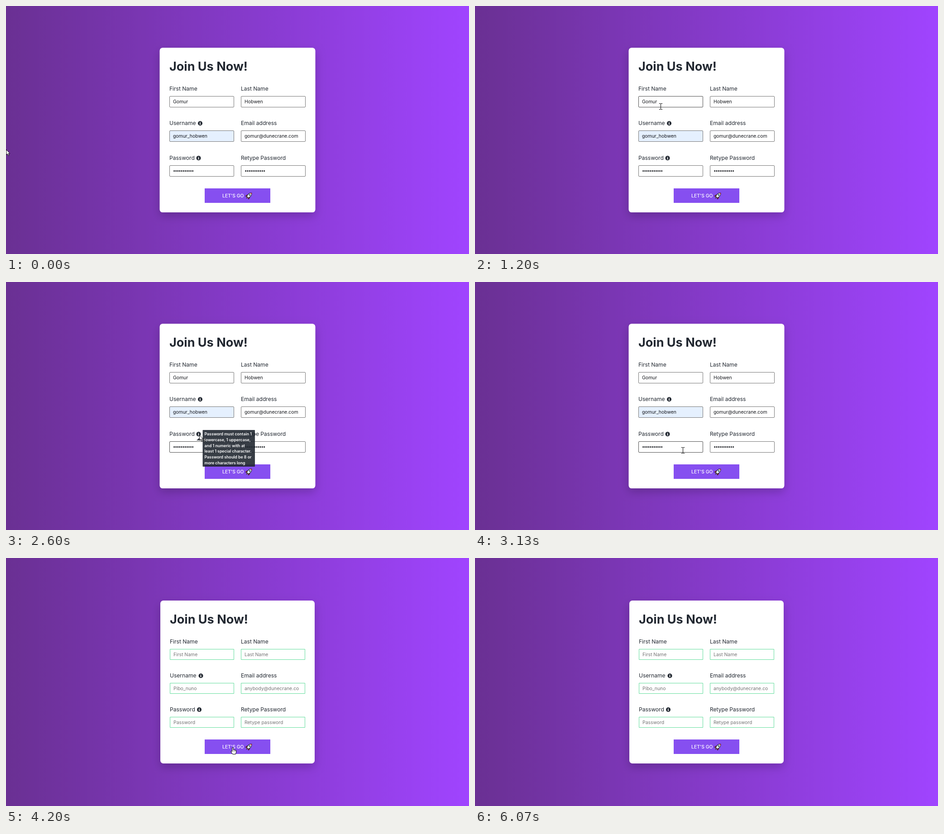
Recreate the animation shown at these times as an HTML page with a canvas. Size 1023 by 548 pixels, loop 6870 ms.

```html
<!DOCTYPE html>
<html lang="en">
<head>
<meta charset="utf-8">
<title>Sign-up form</title>
<style>
  html, body { margin: 0; width: 100%; height: 100%; overflow: hidden; }
  canvas { display: block; width: 100%; height: 100%; }
</style>
</head>
<body>
<canvas id="stage" width="1023" height="548"></canvas>
<script>
const ctx = document.getElementById('stage').getContext('2d');
const W = 1023, H = 548, LOOP = 6870;
const INK = '#222831';
const FONT = 'Inter, "Open Sans", sans-serif';

const filled = {
  card: [339.5, 92.3, 344, 363.8], title: 142.8, x: [361, 519], w: 143,
  rows: [[187, 199, 25], [263, 275, 25], [340, 352, 25]],
  pad: 8, button: 403, border: '#767676', text: '#16181d',
  values: [['Gomur', 'Hobwen'], ['gomur_hobwen', 'gomur@dunecrane.com'], [null, null]]
};
const empty = {
  card: [341, 94, 341, 360], title: 144.8, x: [362, 519], w: 142,
  rows: [[189, 201, 24], [264, 276, 24], [339, 351, 24]],
  pad: 8, button: 401, border: '#62dd9c', text: '#757575',
  values: [['First Name', 'Last Name'], ['Pibo_nuno', 'anybody@dunecrane.co'], ['Password', 'Retype password']]
};
const labels = [['First Name', 'Last Name'], ['Username', 'Email address'], ['Password', 'Retype Password']];

const tips = [
  { box: [438, 250, 115.5, 120], x: 442.5, arrow: [429.5, 268], lines: [
    'Username should be', 'between 4 to 25', 'characters long. Must', 'start with a letter. It only',
    'accepts letters, numbers', 'and undrescore', 'character but cannot', 'end with an underscore', 'character'] },
  { box: [434.5, 327, 115.5, 81], x: 438.5, arrow: [426.5, 345], lines: [
    'Password must contain 1', 'lowercase, 1 uppercase,', 'and 1 numeric with at', 'least 1 special character.',
    'Password should be 8 or', 'more characters long'] }
];

// pointer stops: tick (1/15 s), x, y
const path = [
  [0, 0, 317], [4, 190, 292], [8, 425, 244], [9, 425, 244], [10, 424, 244], [12, 424, 244],
  [18, 410, 222], [20, 411, 223], [23, 429, 249], [24, 429, 249], [25, 431, 260], [26, 431, 268.5],
  [33, 431, 268.5], [36, 428, 304], [39, 427, 338], [44, 427, 338], [51, 501, 418],
  [81, 501, 418], [82, 475, 425], [84, 430, 440], [87, 300, 482], [90, 88, 541], [91, 20, 570]
];

function pointerAt(tick) {
  let i = 0;
  while (i < path.length - 2 && path[i + 1][0] <= tick) i++;
  const [a, ax, ay] = path[i], [b, bx, by] = path[i + 1];
  const p = Math.min(1, (tick - a) / (b - a));
  return { x: Math.round(ax + (bx - ax) * p), y: Math.round(ay + (by - ay) * p) };
}

function text(str, x, y, size, color, weight = 400) {
  ctx.font = `${weight} ${size}px ${FONT}`;
  ctx.fillStyle = color;
  ctx.fillText(str, x, y);
}

function shape(points, fill, stroke, width = 1) {
  ctx.beginPath();
  points.forEach(([x, y]) => ctx.lineTo(x, y));
  ctx.closePath();
  if (fill) { ctx.fillStyle = fill; ctx.fill(); }
  if (stroke) { ctx.strokeStyle = stroke; ctx.lineWidth = width; ctx.stroke(); }
}

function disc(x, y, r, color) {
  ctx.beginPath();
  ctx.arc(x, y, r, 0, Math.PI * 2);
  ctx.fillStyle = color;
  ctx.fill();
}

function background() {
  const g = ctx.createLinearGradient(0, 0, W, 0);
  g.addColorStop(0, '#6a3093');
  g.addColorStop(1, '#a044ff');
  ctx.fillStyle = g;
  ctx.fillRect(0, 0, W, H);
}

function card(rect) {
  ctx.save();
  ctx.shadowColor = 'rgba(0,0,0,.2)';
  ctx.shadowBlur = 20;
  ctx.shadowOffsetY = 8;
  ctx.fillStyle = '#fff';
  ctx.beginPath();
  ctx.roundRect(...rect, 6.5);
  ctx.fill();
  ctx.restore();
}

function infoIcon(x, y) {
  disc(x, y, 5, INK);
  ctx.fillStyle = '#fff';
  ctx.fillRect(x - .7, y - 3, 1.5, 1.5);
  ctx.fillRect(x - 1.3, y - .8, 2, 1);
  ctx.fillRect(x - .6, y - .8, 1.3, 3.2);
  ctx.fillRect(x - 1.5, y + 1.7, 3.1, 1);
}

function field(x, y, w, h, style) {
  ctx.beginPath();
  const inset = style.line / 2;
  ctx.roundRect(x + inset, y + inset, w - style.line, h - style.line, style.radius);
  ctx.fillStyle = style.fill;
  ctx.fill();
  ctx.strokeStyle = style.border;
  ctx.lineWidth = style.line;
  ctx.stroke();
}

function rocket(x, y) {
  ctx.save();
  ctx.translate(x, y);
  ctx.rotate(Math.PI / 4);
  const dark = '#15151d';
  shape([[-1.8, 4], [0, 8.3], [1.8, 4]], '#ffc83d', dark, .8);
  for (const s of [-1, 1]) shape([[s * 2, 0], [s * 5, 3.5], [s * 4.6, 6.5], [s * 1.8, 4.5]], '#e8323f', dark, .9);
  ctx.beginPath();
  ctx.moveTo(0, -8.4);
  ctx.bezierCurveTo(4.4, -4.8, 4, 1, 2.2, 4.8);
  ctx.lineTo(-2.2, 4.8);
  ctx.bezierCurveTo(-4, 1, -4.4, -4.8, 0, -8.4);
  ctx.fillStyle = '#e4f1f6';
  ctx.fill();
  ctx.strokeStyle = dark;
  ctx.lineWidth = 1;
  ctx.stroke();
  shape([[0, -8.2], [1.9, -5.7], [-1.9, -5.7]], '#e8323f');
  disc(0, -2.2, 1.7, dark);
  disc(0, -2.2, 1, '#50b8e8');
  ctx.restore();
}

function button(y) {
  ctx.fillStyle = '#864ff0';
  ctx.fillRect(439, y, 145, 32);
  text("LET'S GO", 478, y + 20, 10.4, '#fff', 500);
  rocket(537, y + 16);
}

function form(view, hoverRow, focused) {
  card(view.card);
  text('Join Us Now!', view.x[0], view.title, 27, INK, 700);
  view.rows.forEach(([base, y, h], row) => view.x.forEach((x, col) => {
    text(labels[row][col], x, base, 12.05, INK);
    const active = focused && row === 2 && col === 1;
    const hover = view === filled && col === 0 && row === hoverRow;
    field(x, y, view.w, h, {
      line: active ? 2 : 1,
      radius: view === filled ? 1.5 : 0,
      border: active ? '#101010' : hover ? '#4f4f4f' : view.border,
      fill: view === filled && row === 1 && col === 0 ? '#e5f0fe' : '#fff'
    });
    const value = view.values[row][col];
    if (value) {
      ctx.save();
      ctx.beginPath();
      ctx.rect(x + view.pad, y, view.w - 2 * view.pad, h);
      ctx.clip();
      text(value, x + view.pad, y + h / 2 + 3.6, 10.4, view.text);
      ctx.restore();
    } else {
      for (let i = 0; i < 11; i++) disc(x + 10.6 + i * 4.1, y + 12.4, 1.5, view.text);
    }
    if (active) {
      ctx.fillStyle = '#000';
      ctx.fillRect(x + 54, y + 5, 1, 14);
    }
  }));
  const shift = view === filled ? 0 : 1.5;
  infoIcon(429 + shift, view.rows[1][0] - 3.8);
  infoIcon(425.5 + shift, view.rows[2][0] - 3.9);
  button(view.button);
}

function tooltip(tip) {
  const [ax, ay] = tip.arrow;
  ctx.save();
  ctx.globalAlpha = .9;
  shape([[ax, ay], [ax + 5.5, ay + 5], [ax - 5.5, ay + 5]], INK);
  ctx.fillStyle = INK;
  ctx.beginPath();
  ctx.roundRect(...tip.box, 1);
  ctx.fill();
  ctx.restore();
  tip.lines.forEach((line, i) => text(line, tip.x, tip.box[1] + 11.9 + i * 12.8, 8.75, '#fff', 600));
}

const cursors = {
  arrow() {
    shape([[.5, .5], [.5, 12], [3.2, 9.5], [5, 13.8], [6.9, 13], [5.1, 8.9], [8.8, 8.9]], '#fff', '#000', .9);
  },
  help() {
    cursors.arrow();
    ctx.font = `700 8px ${FONT}`;
    ctx.lineWidth = 1.6;
    ctx.strokeStyle = '#000';
    ctx.strokeText('?', 9, 15);
    ctx.fillStyle = '#fff';
    ctx.fillText('?', 9, 15);
  },
  beam() {
    ctx.fillStyle = '#000';
    ctx.fillRect(0, -6, 1, 12);
    for (const y of [-7, 6]) {
      ctx.fillRect(-3, y, 3, 1);
      ctx.fillRect(1, y, 3, 1);
    }
  },
  hand() {
    ctx.beginPath();
    ctx.moveTo(-1.2, 9.5);
    ctx.lineTo(-1.2, 1.2);
    ctx.quadraticCurveTo(0, -.6, 1.2, 1.2);
    ctx.lineTo(1.2, 5.5);
    ctx.quadraticCurveTo(2.6, 4.6, 3.5, 6);
    ctx.quadraticCurveTo(5, 5.2, 5.7, 6.7);
    ctx.quadraticCurveTo(7.6, 6.2, 7.7, 8);
    ctx.lineTo(7.5, 11.5);
    ctx.lineTo(6.2, 15.5);
    ctx.lineTo(-.2, 15.5);
    ctx.lineTo(-4, 10);
    ctx.quadraticCurveTo(-4, 7.6, -1.2, 9.5);
    ctx.closePath();
    ctx.fillStyle = '#fff';
    ctx.fill();
    ctx.strokeStyle = '#000';
    ctx.lineWidth = 1;
    ctx.stroke();
    ctx.fillStyle = '#000';
    for (const x of [1.3, 3.5, 5.6]) ctx.fillRect(x - .3, 6.5, .6, 3);
  }
};

function cursorKind({ x, y }, view, tip) {
  if (x >= 439 && x <= 584 && y >= view.button && y <= view.button + 32) return 'hand';
  if (tip) return 'help';
  const inField = x >= 361 && x <= 504 && view.rows.some(([, top, h]) => y >= top && y <= top + h);
  return inField ? 'beam' : 'arrow';
}

function draw(t) {
  const tick = Math.floor(t * .015 + .06);
  const view = tick < 62 ? filled : empty;
  const pos = pointerAt(tick);
  const overColumn = pos.x >= 361 && pos.x <= 504;
  const hoverRow = overColumn ? view.rows.findIndex(([base, y, h]) => pos.y > base - 13 && pos.y <= y + h) : -1;
  const nearIcon = pos.x >= 420 && pos.x <= 436;
  const tip = view === filled && nearIcon &&
    tips.find(({ box, arrow }) => pos.y > box[1] && pos.y <= arrow[1] + 5);

  background();
  form(view, hoverRow, tick === 61);
  if (tip) tooltip(tip);
  if (tick < 91) {
    ctx.save();
    ctx.translate(pos.x, pos.y);
    cursors[cursorKind(pos, view, tip)]();
    ctx.restore();
  }
}

const start = performance.now();
function loop() {
  draw((performance.now() - start) % LOOP);
  requestAnimationFrame(loop);
}
loop();
</script>
</body>
</html>
```
